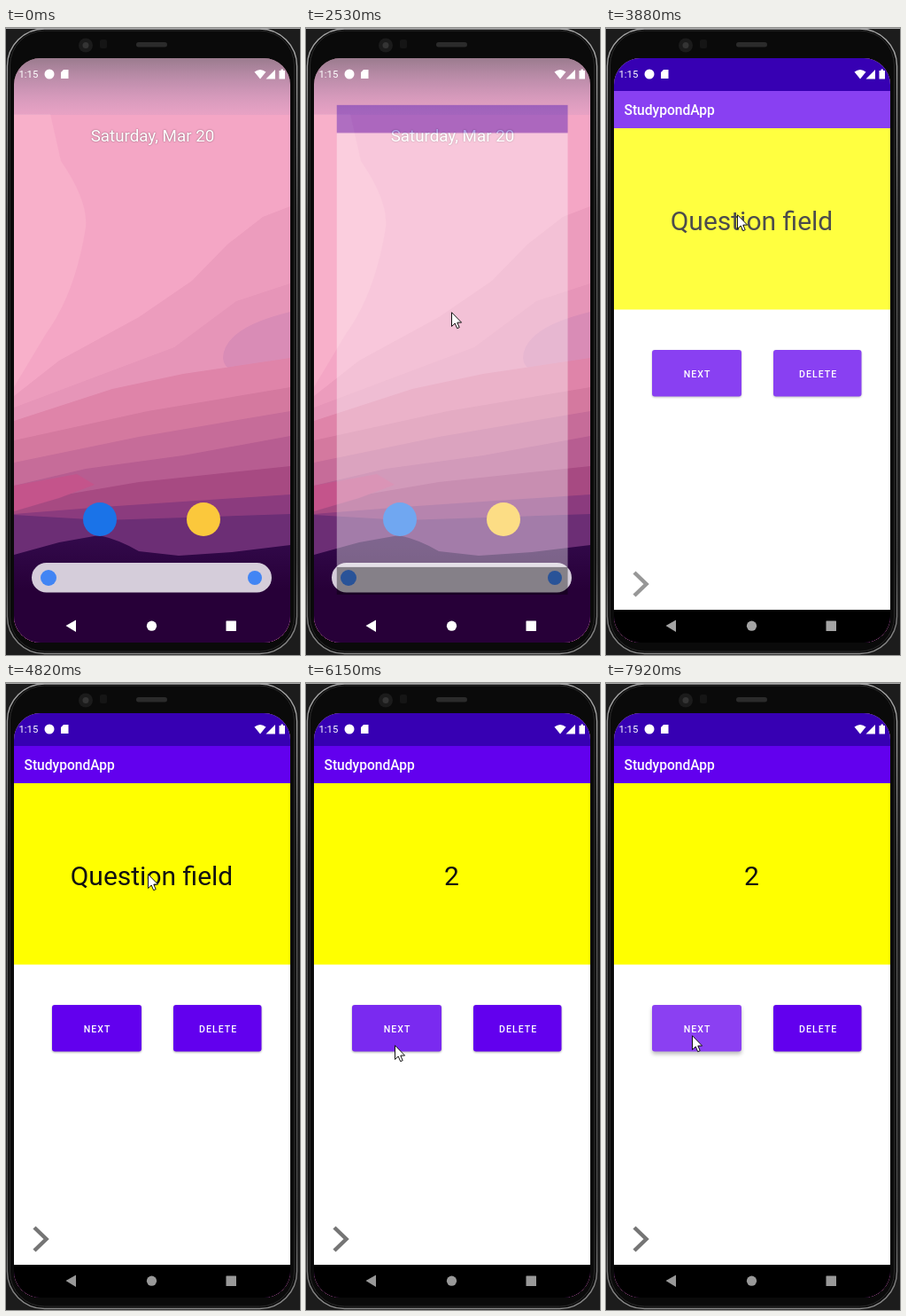
An HTML page without scripts that plays this animation: 332 px wide and 707 px high, repeating every 8 s.

```html
<!DOCTYPE html>
<html lang="en">
<head>
<meta charset="utf-8">
<title>Study card app on a phone</title>
<style>
html, body { margin: 0; width: 100%; height: 100%; overflow: hidden; background: #1c1c1c; }
svg { display: block; width: 332px; height: 707px; font-family: Roboto, sans-serif; }

/* Every change is a hard step on one shared 8 s clock. */
.anim { animation: 8s step-end -1ms infinite; }

#window { transform-origin: 164px 361px; animation-name: open; }
#app { animation-name: app; }
#nav { fill: #fff; animation-name: nav; }
#label { animation-name: label; }
#sum { animation-name: sum; }
#answer { animation-name: answer; }
#next { animation-name: press; }
#cursor { animation-name: cursor; }

.prompt { font-size: 30px; text-anchor: middle; fill: #111; }
.caption { font-size: 10.6px; font-weight: 500; letter-spacing: 1px; text-anchor: middle; fill: #fff; }
.button { fill: #6200ee; filter: drop-shadow(0 1px 1px #0005); }
.crisp { shape-rendering: crispEdges; }

@keyframes open {
  0% { opacity: 0; transform: scale(.837); }
  31.625% { opacity: .38; transform: scale(.837); }
  33.125% { opacity: .87; transform: scale(.992); }
  35% { opacity: .98; transform: none; }
  36.5%, 100% { opacity: 1; transform: none; }
}
@keyframes app {
  0% { opacity: 0; }
  46.875% { opacity: .3; }
  48.5% { opacity: .75; }
  50.375%, 100% { opacity: 1; }
}
@keyframes nav {
  0% { fill: #fff; }
  38.25% { fill: #f5f5f5; }
  39.75% { fill: #ebebeb; }
  41.25% { fill: #e0e0e0; }
  43.125% { fill: #d0d0d0; }
  45% { fill: #c0c0c0; }
  46.875% { fill: #b0b0b0; }
  48.5% { fill: #a4a4a4; }
  50.375%, 100% { fill: #999; }
}
@keyframes label { 0% { opacity: 1; } 71.625%, 100% { opacity: 0; } }
@keyframes sum { 0% { opacity: 0; } 71.625% { opacity: 1; } 76.875%, 100% { opacity: 0; } }
@keyframes answer { 0% { opacity: 0; } 76.875%, 100% { opacity: 1; } }
@keyframes press {
  0%, 73.5%, 80.25%, 85.5% { fill: #6200ee; filter: drop-shadow(0 1px 1px #0005); }
  70.125%, 75.375%, 82.125% { fill: #8b40f2; filter: drop-shadow(0 3px 2px #0005); }
  71.625%, 76.875%, 83.625% { fill: #7a2af0; filter: drop-shadow(0 1px 1px #0005); }
  78.625% { fill: #6e15ef; filter: drop-shadow(0 1px 1px #0005); }
  96% { fill: #6f18ef; filter: drop-shadow(0 1px 1px #0005); }
  97.5% { fill: #7d2ef1; filter: drop-shadow(0 2px 2px #0005); }
  99%, 100% { fill: #8b40f2; filter: drop-shadow(0 3px 2px #0004); }
}
@keyframes cursor {
  0% { opacity: 0; transform: translate(217px, 646px); }
  5% { opacity: 1; transform: translate(217px, 646px); }
  6.625% { transform: translate(208px, 613px); }
  8.5% { transform: translate(201px, 490px); }
  10% { transform: translate(193px, 377px); }
  15.375% { transform: translate(164px, 320px); }
  38.25% { transform: translate(168px, 305px); }
  39.75% { transform: translate(174px, 282px); }
  41.25% { transform: translate(179px, 262px); }
  43.125% { transform: translate(155px, 212px); }
  45% { transform: translate(148px, 210px); }
  60.25% { transform: translate(160px, 215px); }
  62.125% { transform: translate(151px, 240px); }
  63.625% { transform: translate(138px, 290px); }
  65.125% { transform: translate(122px, 342px); }
  66.75% { transform: translate(108px, 387px); }
  68.25% { transform: translate(100px, 408px); }
  96% { transform: translate(99px, 404px); }
  97.5% { transform: translate(98px, 400px); }
  99%, 100% { opacity: 1; transform: translate(97px, 397px); }
}
</style>
</head>
<body>
<svg viewBox="0 0 332 707">
  <defs>
    <clipPath id="screen"><rect x="9" y="34" width="312" height="659" rx="30"/></clipPath>
    <linearGradient id="rim" x2="0" y2="1">
      <stop stop-color="#a8a8a8"/><stop offset=".3" stop-color="#555"/>
      <stop offset=".85" stop-color="#4a4a4a"/><stop offset="1" stop-color="#8c8c8c"/>
    </linearGradient>
    <linearGradient id="shade" x2="0" y2="1">
      <stop stop-color="#6a6470" stop-opacity=".65"/>
      <stop offset=".5" stop-color="#8a7898" stop-opacity=".42"/>
      <stop offset="1" stop-color="#b090c0" stop-opacity=".18"/>
    </linearGradient>
    <linearGradient id="ground" x2="0" y2="1">
      <stop stop-color="#330a4c"/><stop offset=".5" stop-color="#270038"/>
    </linearGradient>
  </defs>

  <!-- Phone body -->
  <rect x="1.5" y="1" width="327" height="704.500" rx="42" fill="#0a0a0a" stroke="url(#rim)" stroke-width="1.500"/>
  <rect x="4.5" y="3" width="321" height="700" rx="39" fill="none" stroke="#2a2a2a"/>
  <rect width="332" height="1" fill="#aaa"/>
  <circle cx="90" cy="19.500" r="8" fill="#1b1b1b"/>
  <circle cx="90" cy="19.500" r="3.500" fill="#343434"/>
  <rect x="106" y="13" width="8" height="10" rx="2" fill="#151515"/>
  <rect x="147" y="16" width="35" height="5.500" rx="2.700" fill="#2b2b2b"/>

  <g clip-path="url(#screen)">
    <!-- Wallpaper -->
    <path fill="#f4a6c5" d="M9 34H321V693H9Z"/>
    <path fill="#f8b0ca" d="M9 97H50L62 150Q93 195 90 225Q78 300 45 345L9 405Z"/>
    <path fill="#ec9cbd" d="M9 415L60 375 150 326 210 285 250 244 290 213 321 201V693H9Z"/>
    <path fill="#e695b8" d="M9 428L110 390 190 360 260 308 321 288V693H9Z"/>
    <path fill="#d98cb6" d="M321 320Q246 338 245 372Q247 400 321 384Z"/>
    <path fill="#df84a9" d="M9 443L120 407 200 390 321 372V693H9Z"/>
    <path fill="#d4799f" d="M9 465L160 432 321 405V693H9Z"/>
    <path fill="#c66c99" d="M9 490L150 461 321 432V693H9Z"/>
    <path fill="#b75d91" d="M9 516L90 497 200 482 321 460V693H9Z"/>
    <path fill="#a74a82" d="M9 536L150 512 321 494V693H9Z"/>
    <path fill="#c4548b" d="M9 516L80 503 100 515 60 530 9 545Z"/>
    <path fill="#8b3b7e" d="M9 548L110 540 321 526V693H9Z"/>
    <path fill="#6c2e75" d="M9 549L110 555 321 548V693H9Z"/>
    <path fill="url(#ground)" d="M9 594L60 580 105 572Q128 577 150 590L195 595 255 591 321 583V693H9Z"/>
    <rect x="9" y="34" width="312" height="64" fill="url(#shade)"/>

    <!-- Home screen -->
    <text x="165.500" y="128" font-size="18.800" text-anchor="middle" fill="#fff" style="text-shadow:0 0 2px #0007">Saturday, Mar 20</text>
    <circle cx="106" cy="554" r="19" fill="#1a73e8"/>
    <circle cx="223" cy="554" r="19" fill="#fbc83c"/>
    <rect x="29" y="603" width="271" height="33.500" rx="16.700" fill="#d5cdda"/>
    <circle cx="48" cy="620" r="9" fill="#4285f4"/>
    <circle cx="281" cy="620" r="8" fill="#4285f4"/>

    <!-- Launched app -->
    <g id="window" class="anim">
      <g class="crisp">
        <path fill="#fff" d="M9 71H321V656H9Z"/>
        <path fill="#3700b3" d="M9 34H321V71H9Z"/>
        <path d="M9 656H321V693H9Z"/>
      </g>
      <g id="app" class="anim">
        <path fill="#6200ee" d="M9 71H321V113H9Z"/>
        <text x="20.500" y="98" font-size="15.600" font-weight="500" fill="#fff">StudypondApp</text>
        <path fill="#ff0" d="M9 113H321V317.500H9Z"/>
        <g class="prompt">
          <text id="label" class="anim" x="164.500" y="227.500">Question field</text>
          <text id="sum" class="anim" x="164.500" y="227.500">1+1?</text>
          <text id="answer" class="anim" x="164.500" y="227.500">2</text>
        </g>
        <rect id="next" class="button anim" x="52" y="363" width="101" height="52.500" rx="3"/>
        <rect class="button" x="189" y="363" width="99.500" height="52.500" rx="3"/>
        <g class="caption">
          <text x="103" y="393.500">NEXT</text>
          <text x="239.700" y="393.500">DELETE</text>
        </g>
        <path d="M32 614L45.500 627 32 640" fill="none" stroke="#757575" stroke-width="4.500"/>
      </g>
    </g>

    <!-- System bars -->
    <g fill="#fff">
      <text x="14.500" y="56" font-size="11.300">1:15</text>
      <circle cx="49" cy="52" r="5.500"/>
      <path d="M65 47H70.500V57H62V50Z"/>
      <path d="M280.500 49.500Q287 44.500 293.500 49.500L287 57.500Z"/>
      <path d="M304 47V57.500H293.500Z"/>
      <path d="M308.500 48H310.500V46.500H313V48H315V57.500H308.500Z"/>
    </g>
    <g id="nav" class="anim">
      <path d="M67.500 674L79 667.500V681Z"/>
      <circle cx="164.500" cy="674.200" r="5.600"/>
      <rect x="248.500" y="668.500" width="11.500" height="11.500" rx=".5"/>
    </g>
  </g>

  <path id="cursor" class="anim" fill="#fff" stroke="#111" d="M.5 .7V16.500L4.200 13 6.700 18.700 9.200 17.600 6.800 12.100H11.600Z"/>
</svg>
</body>
</html>
```
